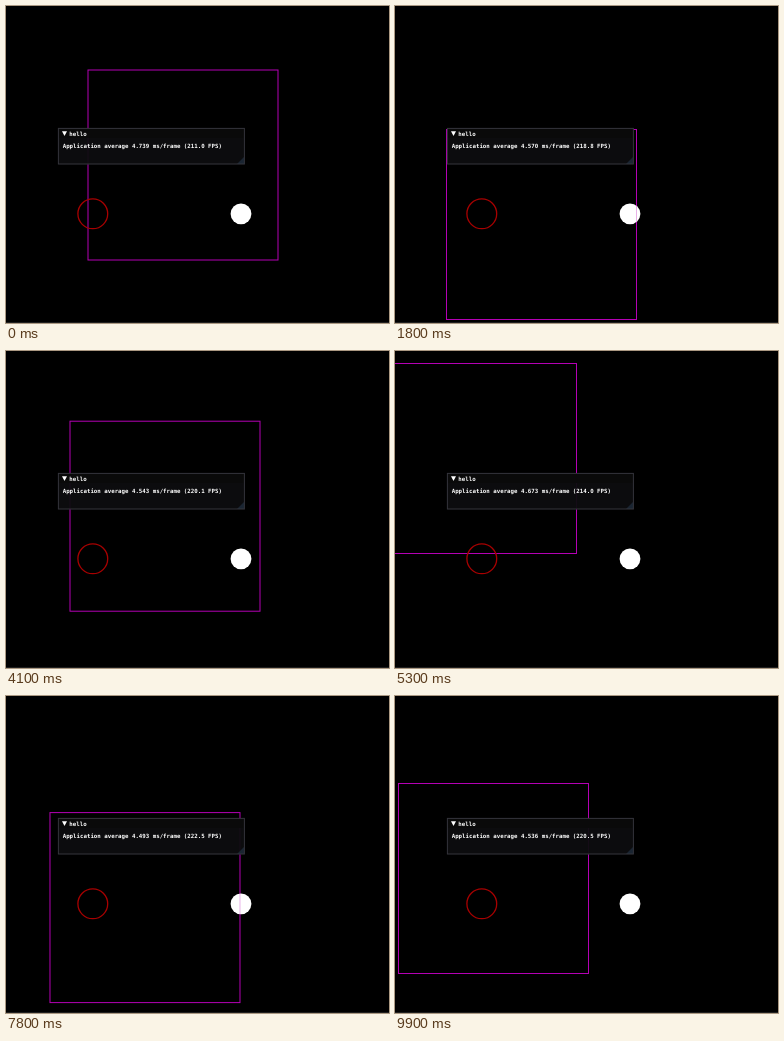
An HTML page with a canvas for the animation above (10 s loop, 383x317 px).

```html
<!DOCTYPE html>
<html lang="en">
<head>
<meta charset="utf-8">
<title>hello</title>
<style>
html, body { margin: 0; width: 100%; height: 100%; overflow: hidden; background: #000; }
canvas { display: block; }
</style>
</head>
<body>
<canvas id="stage" width="383" height="317"></canvas>
<script>
const ctx = document.getElementById('stage').getContext('2d');
const LOOP = 10000, STEP = 100, SIDE = 190;

// Key poses of the square: [step, left, top].
const poses = [
  [0, 82, 64], [4, 110, 34], [8, 11, 60], [13, 99, 100], [18, 51.5, 123.5],
  [24, 122, 70], [29, 67, 23.5], [38, 110, 87], [44, 18, 41], [48, 104, 5],
  [53, -8.5, 12.5], [60, 84, 72], [69, 36, 16], [77, 40, 108], [87, 154.5, 173.5],
  [99, 3.5, 87.5]
];
// Milliseconds per frame shown in the panel: [step, ms].
const timings = [[0, 4.739], [18, 4.57], [29, 4.414], [53, 4.673], [69, 4.4256], [87, 4.5612], [99, 4.536]];

// Monotone cubic through one column of the keys.
function along(keys, s, col = 1) {
  let i = 0;
  while (i < keys.length - 2 && s >= keys[i + 1][0]) i++;
  const slope = k => {
    const a = keys[k], b = keys[k + 1];
    return a && b ? (b[col] - a[col]) / (b[0] - a[0]) : 0;
  };
  const tangent = k => {
    const a = slope(k - 1), b = slope(k);
    return a * b <= 0 ? 0 : 2 * a * b / (a + b);
  };
  const d = keys[i + 1][0] - keys[i][0], u = (s - keys[i][0]) / d, w = 1 - u;
  return keys[i][col] * w * w * (1 + 2 * u) + keys[i + 1][col] * u * u * (3 - 2 * u)
    + d * u * w * (tangent(i) * w - tangent(i + 1) * u);
}

function polygon(color, ...pts) {
  ctx.fillStyle = color;
  ctx.beginPath();
  pts.forEach(([x, y]) => ctx.lineTo(x, y));
  ctx.fill();
}

function circle(x, y, r) {
  ctx.beginPath();
  ctx.arc(x, y, r, 0, Math.PI * 2);
}

function drawSquare(x, y) {
  ctx.strokeStyle = '#b400b4';
  ctx.lineWidth = 1;
  ctx.strokeRect(x, y, SIDE, SIDE);
}

function drawCircles(x, y) {
  ctx.strokeStyle = '#a80000';
  ctx.lineWidth = 1.3;
  circle(86.8, 207.8, 14.9);
  ctx.stroke();

  ctx.save();
  ctx.fillStyle = '#fff';
  circle(235, 207.8, 10.4);
  ctx.fill();
  ctx.clip();
  ctx.globalAlpha = 0.3;
  drawSquare(x, y);
  ctx.restore();
}

function drawPanel(ms) {
  ctx.fillStyle = 'rgba(13,13,15,0.95)';
  ctx.fillRect(52.3, 122.3, 186.2, 36);
  ctx.fillStyle = '#0a0a0a';
  ctx.fillRect(53, 123, 185, 9);
  polygon('#1a2532', [238, 151], [238, 158], [231, 158]);
  ctx.strokeStyle = '#34343b';
  ctx.lineWidth = 1;
  ctx.strokeRect(52.4, 122.4, 186, 35.6);
  polygon('#fff', [56, 125.2], [61, 125.2], [58.5, 130]);

  ctx.fillStyle = '#fff';
  ctx.font = 'bold 5.75px "DejaVu Sans Mono", monospace';
  ctx.fillText('hello', 63.3, 129.8);
  const fps = (1000 / ms).toFixed(1);
  ctx.fillText(`Application average ${ms.toFixed(3)} ms/frame (${fps} FPS)`, 56.7, 141.8);
}

function draw(now) {
  const s = Math.floor((now % LOOP) / STEP);
  const x = along(poses, s, 1), y = along(poses, s, 2);
  ctx.fillStyle = '#000';
  ctx.fillRect(0, 0, 383, 317);
  drawSquare(x, y);
  drawCircles(x, y);
  drawPanel(along(timings, s));
  ctx.fillStyle = '#202020';
  ctx.fillRect(0, 316, 383, 1);
}

let start = null;
function tick(now) {
  if (start === null) start = now;
  draw(now - start);
  requestAnimationFrame(tick);
}
draw(0);
requestAnimationFrame(tick);
</script>
</body>
</html>
```
